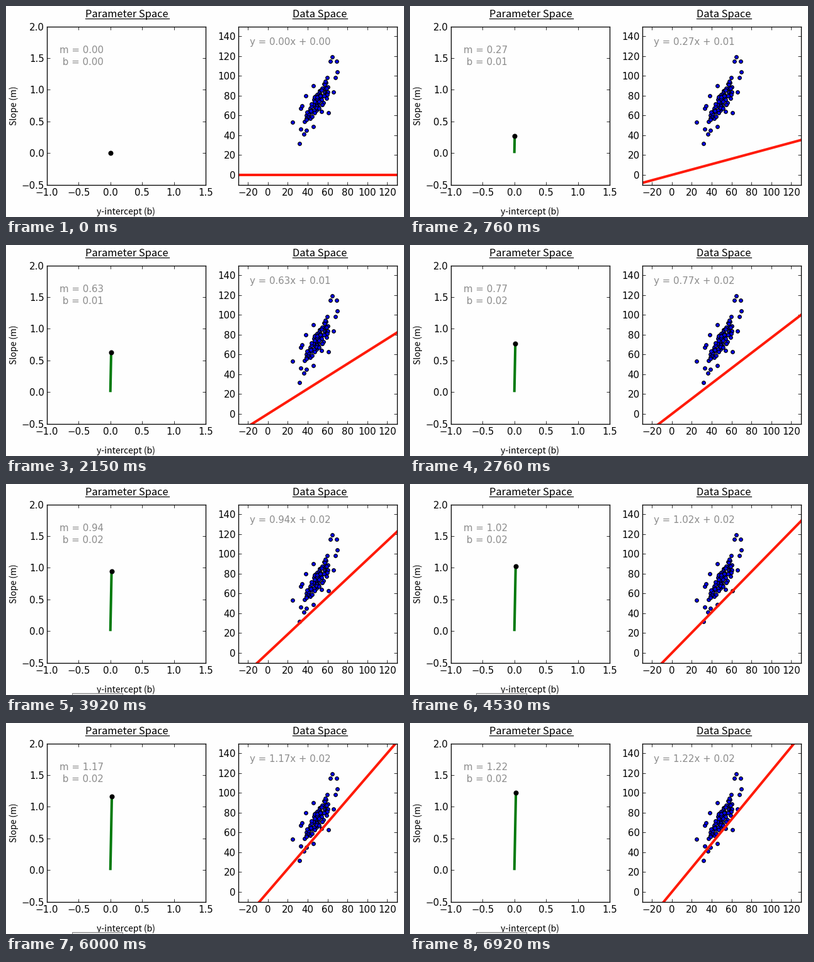
A matplotlib script for the animation above (7 s loop, 632 by 336 pixels).

```python
import matplotlib.pyplot as plt
import numpy as np
from matplotlib.animation import FuncAnimation
from matplotlib.lines import Line2D
from matplotlib.patches import Rectangle

W, H, DPI = 632, 336, 80
PX = 72 / DPI  # points per pixel
FRAMES, LOOP_MS = 91, 7000
PAPER = "#fefefe"
LABEL_FONT, PLOT_FONT = "Noto Sans CJK JP", "DejaVu Sans"
POPUP_START = 45

# The slope decays towards its best fit; the pace varies slightly.
BEST_SLOPE = 1.48
KEY_FRAMES = [0, 9, 20, 35, 50, 67, 90]
KEY_SLOPES = np.array([0, 0.271, 0.491, 0.769, 0.942, 1.103, 1.224])
PROGRESS = -np.log(1 - KEY_SLOPES / BEST_SLOPE)

# Points that stand clear of the cloud.
OUTLIERS = [(25, 53), (32, 32), (33, 46), (36, 41), (39, 45), (46, 49),
            (33, 67), (34, 70), (38, 80), (46, 90), (54, 64), (61, 63),
            (66, 84), (68, 98), (70, 104), (69, 115), (65, 119), (63, 115)]


def data_cloud(count=82):
    """A band around a rising line that widens to the right."""
    rng = np.random.default_rng(4)
    x = rng.triangular(32, 51, 63, count)
    spread = 4 + 0.3 * (x - 32)
    y = 4 + 1.4 * x + spread * rng.uniform(-1, 1, count)
    return np.vstack([OUTLIERS, np.column_stack([x, y])]).T


def add_axes(left, right, xlim, ylim, xticks, yticks):
    top, bottom = 32.55, 284.7
    ax = fig.add_axes([left / W, 1 - bottom / H, (right - left) / W, (bottom - top) / H],
                      facecolor=PAPER)
    ax.set(xlim=xlim, ylim=ylim, xticks=xticks, yticks=yticks)
    ax.tick_params(direction="in", top=True, right=True, length=5 * PX,
                   width=0.8 * PX, labelsize=15 * PX, labelfontfamily=PLOT_FONT)
    ax.tick_params(axis="x", pad=5 * PX)
    ax.tick_params(axis="y", pad=4 * PX)
    for spine in ax.spines.values():
        spine.set_linewidth(1.3 * PX)
    return ax


def label(x, y, text, size, font=LABEL_FONT, ha="center", **style):
    return fig.text(x / W, 1 - y / H, text, fontsize=size * PX, family=font,
                    ha=ha, va="baseline", **style)


def title(left, right, text):
    label((left + right) / 2, 18, text, 16.4)
    y = 1 - 20.2 / H
    fig.add_artist(Line2D([left / W, right / W], [y, y], color="black", lw=1.2 * PX))


def readout(x, y):
    return label(x, y, "", 15, PLOT_FONT, "left", color="#8c8c8c")


fig = plt.figure(figsize=(W / DPI, H / DPI), dpi=DPI, facecolor=PAPER)

title(126, 258.5, "Parameter Space")
title(455, 541.5, "Data Space")
label(190, 332.3, "y-intercept (b)", 14)
label(16.5, 159, "Slope (m)", 14, rotation=90, rotation_mode="anchor")

params = add_axes(64.8, 317.1, (-1, 1.5), (-0.5, 2),
                  np.arange(-1, 1.6, 0.5), np.arange(-0.5, 2.1, 0.5))
data = add_axes(368.6, 621, (-30, 130), (-10, 150),
                range(-20, 121, 20), range(0, 141, 20))

trail, = params.plot([], [], color="#007a0c", lw=4 * PX, solid_capstyle="butt")
dot, = params.plot([], [], "o", color="black", ms=8 * PX, mew=0)
data.plot(*data_cloud(), "o", mfc="#0000ff", mec="black", ms=5.6 * PX, mew=1.2 * PX)
fit, = data.plot([], [], color="#ff1a08", lw=4 * PX)

slope_text = readout(85, 75)
offset_text = readout(85, 93.5)
formula = readout(387, 62)

# Sliver of a window that slides in under the axis label.
popup = fig.add_artist(Rectangle((104.5 / W, -0.02), 80 / W, 0.02 + 3.5 / H,
                                 transform=fig.transFigure, facecolor="#e6e6e6",
                                 edgecolor="#7f7f7f", lw=PX, zorder=10))


def draw(frame):
    m = BEST_SLOPE * (1 - np.exp(-np.interp(frame, KEY_FRAMES, PROGRESS)))
    b = 0.02 * m
    trail.set_data([0, b], [0, m])
    dot.set_data([b], [m])
    x = np.array([-30, 130])
    fit.set_data(x, m * x + b)
    slope_text.set_text(f"m = {m:.2f}")
    offset_text.set_text(f" b = {b:.2f}")
    formula.set_text(f"y = {m:.2f}x + {b:.2f}")
    popup.set_visible(frame >= POPUP_START)
    return trail, dot, fit, slope_text, offset_text, formula, popup


anim = FuncAnimation(fig, draw, frames=FRAMES, interval=LOOP_MS / FRAMES,
                     repeat=True, repeat_delay=0)
plt.show()
```
